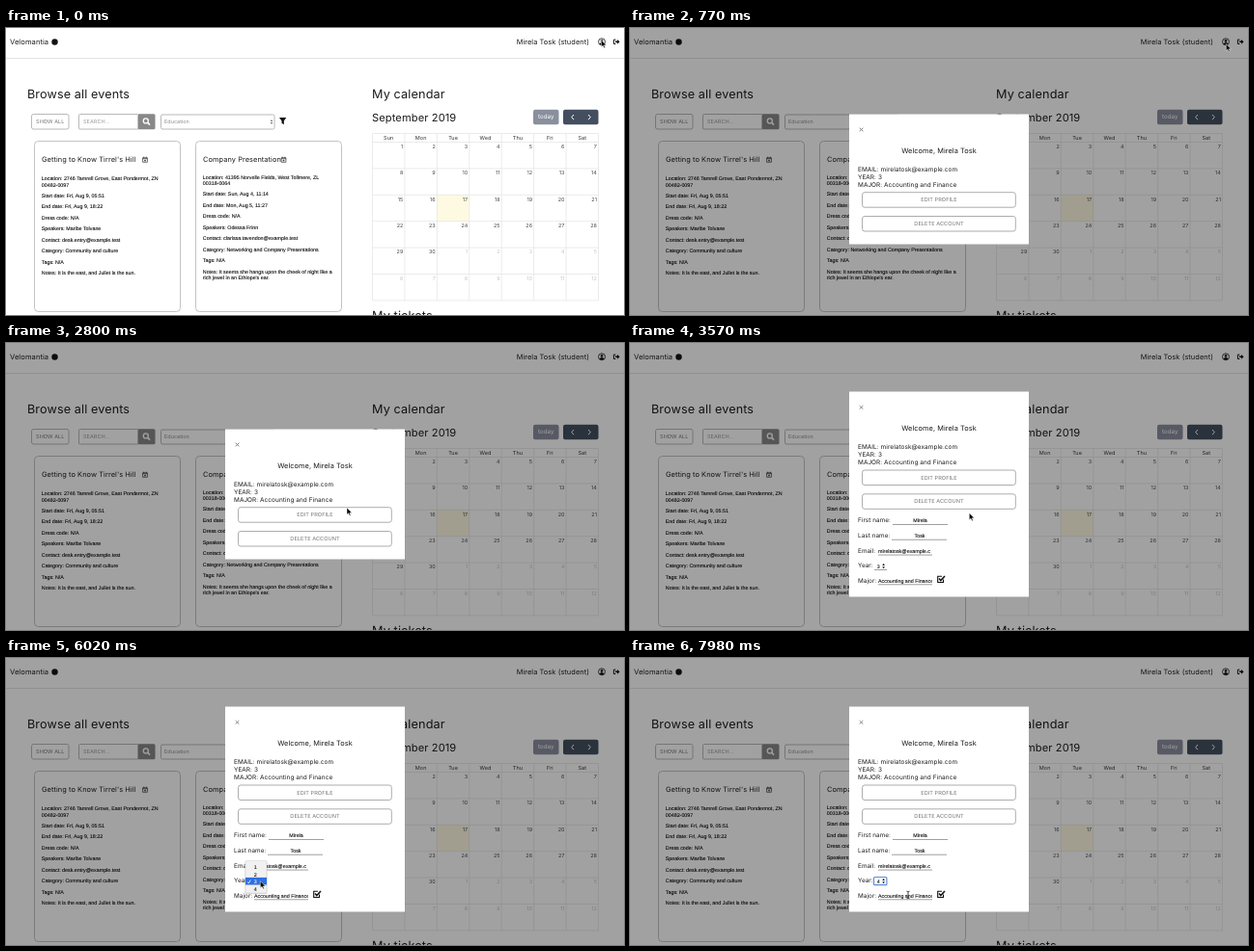
Animation, 640 px wide and 298 px high, one loop 8 s. Source, as an HTML page:

```html
<!DOCTYPE html>
<html lang="en">
<head>
<meta charset="utf-8">
<title>Event browser</title>
<style>
  html, body { margin: 0; width: 100%; height: 100%; overflow: hidden; background: #fff; }
  svg { display: block; }
  text { font-family: Inter, "Open Sans", sans-serif; letter-spacing: .01em; fill: #1c1c1c; text-rendering: geometricPrecision; white-space: pre; }
  text.body { font-family: "Liberation Sans", Arial, sans-serif; letter-spacing: 0; fill: #000; stroke: #000; stroke-width: .08px; }
</style>
</head>
<body>
<svg id="stage" width="100%" height="100%" viewBox="0 0 640 298"></svg>
<script>
const LOOP = 8000, STEP = 70;
const GREY = '#777', EDGE = '#a8a8a8';

const text = (x, y, size, str, attrs = '') =>
  `<text x="${x}" y="${y}" font-size="${size}" ${attrs}>${str}</text>`;
const body = (x, y, str, attrs = '') => text(x, y, 5.33, str, 'class="body" ' + attrs);
const rect = (x, y, w, h, fill = 'none', attrs = '') =>
  `<rect x="${x}" y="${y}" width="${w}" height="${h}" fill="${fill}" ${attrs}/>`;
const path = (d, stroke, width = .8, attrs = 'fill="none"') =>
  `<path d="${d}" stroke="${stroke}" stroke-width="${width}" ${attrs}/>`;
const at = (x, y, inner) => `<g transform="translate(${x} ${y})">${inner}</g>`;
const outline = (color = EDGE, rx = 2) => `stroke="${color}" stroke-width=".8" rx="${rx}"`;
const middle = 'text-anchor="middle" ';
const end = 'text-anchor="end" ';
const fill = color => `style="fill:${color}" `;
const arrows = (x, y, color) =>
  at(x, y, `<path d="M-1.3-.6L0-2.6 1.3-.6zM-1.3.6L0 2.6 1.3.6z" fill="${color}"/>`);

function header() {
  const user = '<circle r="3.5" fill="none" stroke="#111" stroke-width=".8"/>' +
    '<circle cy="-.9" r="1.3" fill="#111"/><path d="M-2.5 2.3Q-2 .7 0 .7T2.5 2.3Q0 4 -2.5 2.3z" fill="#111"/>';
  const logout = path('M-.6-2.2H-2.6V2.2H-.6', '#111', 1) +
    '<path d="M-1-.8H1V-2.4L3.6 0 1 2.4V.8H-1z" fill="#111"/>';
  return text(4, 17, 7.55, 'Velomantia') + '<circle cx="50.5" cy="14.5" r="3.2" fill="#111"/>' +
    text(604, 17, 7.4, 'Mirela Tosk (student)', end) +
    at(617, 14.3, user) + at(632, 14.3, logout) + rect(0, 31, 640, 1, '#e4e4e4');
}

function filters() {
  return text(22, 73.3, 12.6, 'Browse all events') +
    rect(26.5, 89.5, 38.5, 15.5, '#fff', outline()) +
    text(45.7, 99.3, 5.5, 'SHOW ALL', middle + fill(GREY)) +
    rect(75.5, 89.5, 62, 15.5, '#fff', outline(EDGE, 1)) +
    text(80, 99.3, 5.5, 'SEARCH...', fill('#999')) +
    rect(136.5, 89.2, 18, 16, '#888', 'rx="1.5"') +
    '<circle cx="144.8" cy="96.4" r="2.5" fill="none" stroke="#fff" stroke-width="1.3"/>' +
    path('M146.7 98.3L149 100.6', '#fff', 1.6) +
    rect(160.5, 90, 117.5, 15, '#fff', outline(EDGE, 1.5)) +
    text(164, 99.3, 5.4, 'Education', fill('#888')) + arrows(275, 97.5, '#777') +
    '<path d="M283 93H290.3L287.8 96.5V100.3L285.5 98.8V96.5z" fill="#111"/>';
}

function card(x, title, iconX, firstLine, lines) {
  const icon = path('M-2.4-1.8H2.4V2.7H-2.4zM-2.4-.9H2.4M-1.3-3V-1.6M1.3-3V-1.6M-1 1H1M0 0V2', '#111', .6);
  const [place, zip, ...rest] = lines;
  return rect(x, 117.5, 151, 177, '#fff', outline('#b4b4b4', 4)) +
    text(x + 7.5, 139, 7.4, title) + at(iconX, 136.6, icon) +
    body(x + 7.3, firstLine, 'Location: ' + place) + body(x + 7.3, firstLine + 6.3, zip) +
    rest.map((line, i) => line.split('|').map((part, j) =>
      body(x + 7.3, firstLine + 17.5 + i * 11.5 + j * 6.3, part)).join('')).join('');
}

function calendar() {
  const left = 379.5, top = 118.5, w = 33.43, h = 27.4;
  let out = text(379, 73.3, 12.7, 'My calendar') + text(379, 97, 11.1, 'September 2019') +
    rect(546, 84.8, 26.5, 15.4, '#8a8f9e', 'rx="2"') + text(559.2, 94.4, 6.2, 'today', middle + fill('#fff')) +
    rect(577, 84.8, 36.5, 15.4, '#434f5f', 'rx="2"') +
    path('M588 90L585.7 92.6 588 95.2M603 90L605.3 92.6 603 95.2', '#fff', 1) +
    rect(left + 2 * w, top + 2 * h, w, h, '#fefae2');
  let grid = `M${left} 109.5H613.5`;
  for (let r = 0; r <= 6; r++) grid += `M${left} ${top + r * h}H613.5`;
  for (let c = 0; c <= 7; c++) grid += `M${left + c * w} 109.5V${top + 6 * h}`;
  out += path(grid, '#e2e2e2', .7);
  'Sun Mon Tue Wed Thu Fri Sat'.split(' ').forEach((day, c) => {
    out += text(left + (c + .5) * w, 116, 5.5, day, middle + fill('#333'));
  });
  for (let i = 0; i < 42; i++) {
    const x = left + (i % 7 + 1) * w - 1.6, y = top + Math.floor(i / 7) * h + 6.3;
    out += text(x, y, 5.4, i % 30 + 1, end + fill(i < 30 ? '#444' : '#c4c4c4'));
  }
  return out + text(379, 303, 12.7, 'My tickets');
}

function page() {
  return header() + filters() +
    card(29.5, "Getting to Know Tirrel's Hill", 144, 158.4, [
      '2746 Tamrell Grove, East Pondermot, ZN', '00482-0097', 'Start date: Fri, Aug 9, 05:51',
      'End date: Fri, Aug 9, 18:22', 'Dress code: N/A', 'Speakers: Maribe Tolvane',
      'Contact: desk.entry@example.test', 'Category: Community and culture', 'Tags: N/A',
      'Notes: It is the east, and Juliet is the sun.']) +
    card(196.5, 'Company Presentation', 287.5, 156.6, [
      '41395 Norvelle Fields, West Tollmere, ZL', '00318-0064', 'Start date: Sun, Aug 4, 11:14',
      'End date: Mon, Aug 5, 11:27', 'Dress code: N/A', 'Speakers: Odessa Frinn',
      'Contact: clarissa.tavendon@example.test', 'Category: Networking and Company Presentations',
      'Tags: N/A', "Notes: It seems she hangs upon the cheek of night like a|rich jewel in an Ethiope's ear."]) +
    calendar();
}

function profile() {
  const button = (y, label, id) => rect(240.5, y, 158.8, 15.5, '#fff', `id="${id}" ` + outline('#999', 2.5)) +
    text(320, y + 9.7, 5.6, label, middle + fill(GREY));
  return path('M237.7 103.7L241.3 107.3M241.3 103.7L237.7 107.3', '#777', .9) +
    text(320, 130, 7.35, 'Welcome, Mirela Tosk', middle) +
    text(236, 148.6, 6.45, 'EMAIL: mirelatosk@example.com') +
    text(236, 156.6, 6.45, 'YEAR: 3') +
    text(236, 164.6, 6.45, 'MAJOR: Accounting and Finance') +
    button(170.7, 'EDIT PROFILE', 'edit') + button(195.5, 'DELETE ACCOUNT', 'remove');
}

function form() {
  const label = (y, str) => text(236, y, 6.35, str);
  const underline = (x, y, w) => rect(x, y, w, .7, '#777');
  const clipped = (y, str) =>
    `<svg x="257" y="${y - 6}" width="56" height="8">${body(0, 6, str)}</svg>` + underline(257, y + 2, 56);
  return label(186.3, 'First name:') + body(300.5, 186.3, 'Mirela', middle) + underline(272, 188, 57) +
    label(202, 'Last name:') + body(300, 202, 'Tosk', middle) + underline(271, 203.8, 57) +
    label(217.7, 'Email:') + clipped(217.7, 'mirelatosk@example.c') +
    label(233.2, 'Year:') + underline(253, 235.2, 13) +
    rect(252.5, 227.5, 13.4, 8.2, '#fff', 'id="ring" rx="1" stroke="#5b8fd6" stroke-width="1.2"') +
    body(255.7, 233.5, '3', 'id="year"') + arrows(262.6, 231.7, '#111') +
    label(248.5, 'Major:') + clipped(248.5, 'Accounting and Finance') +
    path('M324.5 245.5V248.5H318.7V242.3H323', '#111', 1.1) + path('M320 244.6L321.8 246.6 326 242', '#111', 1.5);
}

function menu() {
  const items = [1, 2, 3, 4].map(n => body(256.8, 211.5 + n * 7.6, n, `id="item${n}"`)).join('');
  return rect(247.5, 210.7, 23, 34.2, '#000', 'opacity=".15" rx="1.5"') +
    rect(248, 210.5, 22, 33.5, '#f1f1f1', 'rx="1" stroke="#ccc" stroke-width=".4"') +
    rect(248, 235.5, 22, 7.6, '#2f6fe4', 'id="highlight"') + items +
    path('M250.2 232.6L251.3 233.9 253.2 230.6', '#111', .8, 'id="tick" fill="none"');
}

const stage = document.getElementById('stage');
stage.innerHTML = page() +
  '<g id="modal">' + rect(0, 0, 640, 298, '#000', 'opacity=".37"') + rect(227, 89.5, 186, 135, '#fff', 'id="panel"') +
  `<g id="profile">${profile()}</g><g id="form">${form()}</g><g id="menu">${menu()}</g></g>` +
  '<path id="pointer" d="M0 0V7.2L1.7 5.7 2.8 8.2 4 7.7 2.9 5.3H5.2z" fill="#000" stroke="#fff" stroke-width=".5"/>' +
  '<g id="beam">' + path('M-1.5-3.8Q0-3.8 0-2.8Q0-3.8 1.5-3.8M0-2.8V2.8M-1.5 3.8Q0 3.8 0 2.8Q0 3.8 1.5 3.8', '#111', .8) + '</g>';

const el = id => document.getElementById(id);
const show = (id, on) => el(id).setAttribute('display', on ? 'inline' : 'none');
const set = (id, attrs) => Object.entries(attrs).forEach(([k, v]) => el(id).setAttribute(k, v));

// Pointer track: time, x, y
const track = [
  [0, 616.5, 12.5], [560, 617.3, 16.5], [1330, 617.3, 16.5], [2100, 357, 153.5],
  [2170, 357, 153.5], [2310, 356.3, 159], [2380, 356.3, 159], [2660, 353, 169],
  [2800, 353, 171], [3080, 351.3, 176.5], [4620, 351.3, 176.5], [5250, 288, 223],
  [5320, 288, 223], [5670, 265, 229.5], [5810, 264, 230], [6160, 263, 232.5],
  [6440, 262, 237], [7840, 262, 237], [7910, 275, 241], [7980, 288, 246]
];

function pointerAt(t) {
  const i = track.findIndex(key => key[0] > t);
  if (i < 0) return track[track.length - 1].slice(1);
  const [t0, x0, y0] = track[i - 1], [t1, x1, y1] = track[i];
  const p = (t - t0) / (t1 - t0), k = p * p * (3 - 2 * p);
  return [x0 + (x1 - x0) * k, y0 + (y1 - y0) * k];
}

function draw(time) {
  const t = Math.floor(time % LOOP / STEP) * STEP;
  const editing = t >= 3500, chosen = t >= 7490;
  show('modal', t >= 770);
  set('panel', editing ? { y: 50.5, height: 213 } : { y: 89.5, height: 135 });
  set('profile', { transform: `translate(0 ${editing ? -38.7 : 0})` });
  set('edit', { fill: t >= 3360 && t < 3500 ? '#f0f0f0' : '#fff' });
  show('form', editing);
  show('ring', chosen);
  el('year').textContent = chosen ? 4 : 3;

  show('menu', t >= 5810 && t < 7770);
  set('menu', { opacity: chosen ? Math.max(0, 1 - (t - 7420) / 350) : 1 });
  const active = t < 6370 ? 3 : 4, lit = t < 7350 || chosen;
  show('highlight', lit);
  set('highlight', { y: 205.1 + active * 7.6 });
  for (let n = 1; n <= 4; n++) {
    const color = lit && n === active ? '#fff' : '#111';
    Object.assign(el('item' + n).style, { fill: color, stroke: color });
  }
  set('tick', { stroke: lit && active === 3 ? '#fff' : '#111' });

  const place = { transform: `translate(${pointerAt(t).join(' ')})` };
  set('pointer', place);
  set('beam', place);
  show('pointer', t < 7910);
  show('beam', t >= 7910);
}

const start = performance.now();
function frame() {
  draw(performance.now() - start);
  requestAnimationFrame(frame);
}
frame();
</script>
</body>
</html>
```
